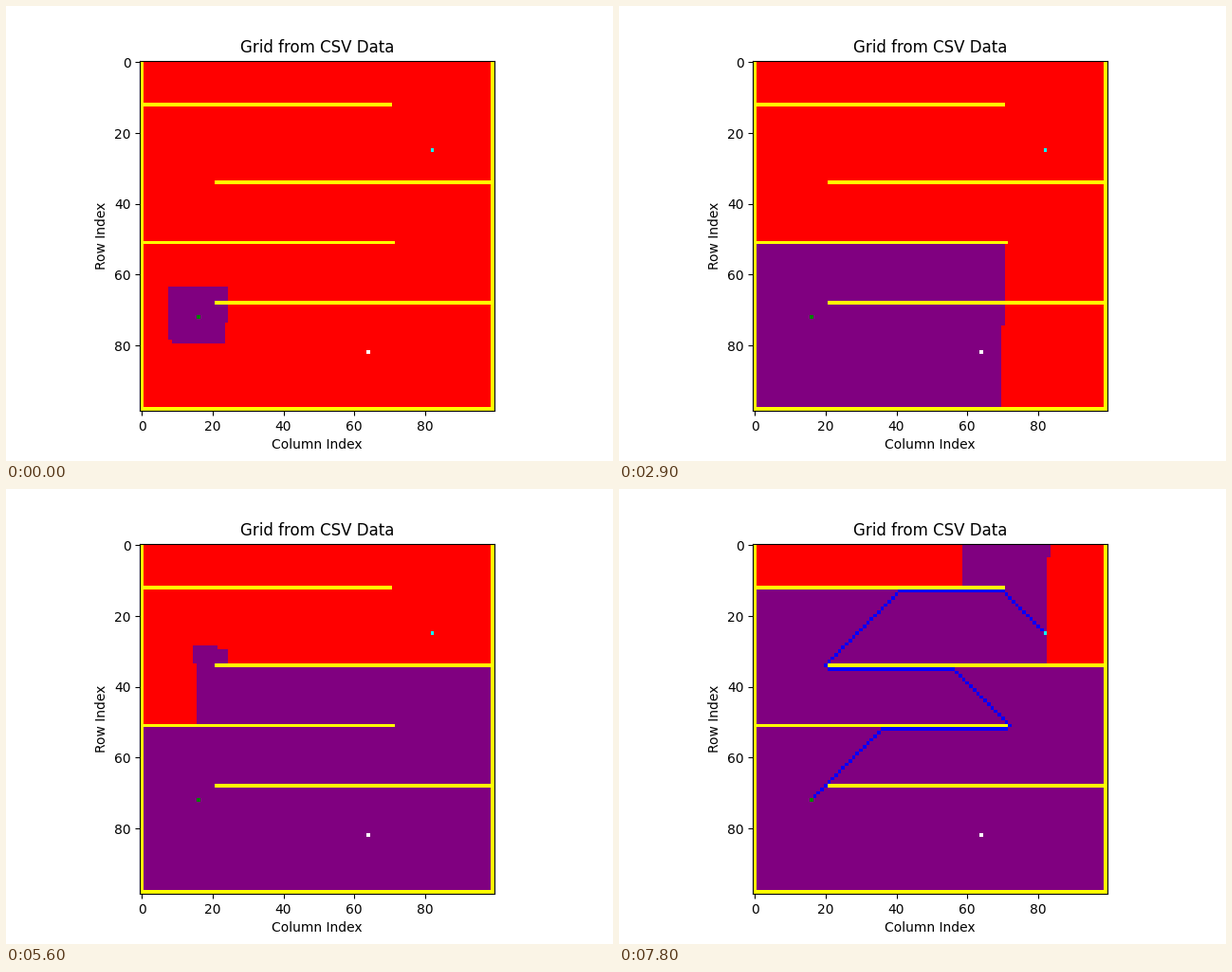
A matplotlib script that plays this animation: 640x480 px, repeating every 8150 ms.

```python
from itertools import product

import matplotlib.pyplot as plt
import numpy as np
from matplotlib.animation import FuncAnimation
from matplotlib.colors import ListedColormap

ROWS, COLS = 99, 100
START, GOAL, MARKER = (72, 16), (25, 82), (82, 64)
FREE, WALL, VISITED, PATH, START_ID, GOAL_ID, MARKER_ID = range(7)
COLORS = ["red", "yellow", "purple", "blue", "green", "cyan", "white"]

INTERVAL = 50            # ms
FRAMES = 163             # 8150 ms
LAST_STEP = 78
FIRST_POPS, POPS_PER_STEP = 200, 100


def build_grid():
    grid = np.full((ROWS, COLS), FREE)
    grid[:, [0, -1]] = WALL
    grid[-1] = WALL
    grid[12, :71] = WALL
    grid[34, 21:] = WALL
    grid[51, :72] = WALL
    grid[68, 21:] = WALL
    grid[MARKER] = MARKER_ID
    return grid


def flood(grid):
    """Breadth-first search; record at which pop each cell is discovered."""
    found_at = np.full(grid.shape, ROWS * COLS)
    found_at[START] = 0
    parent = {START: None}
    queue = [START]
    for pop, (r, c) in enumerate(queue, 1):
        for dr, dc in product((-1, 0, 1), repeat=2):
            cell = (r + dr, c + dc)
            inside = 0 <= cell[0] < ROWS and 0 <= cell[1] < COLS
            if inside and cell not in parent and grid[cell] == FREE:
                parent[cell] = (r, c)
                found_at[cell] = pop
                queue.append(cell)
    return found_at, parent


def trace(parent, cell):
    while cell is not None:
        yield cell
        cell = parent[cell]


base = build_grid()
found_at, parent = flood(base)
path = list(trace(parent, GOAL))


def grid_at(step):
    grid = base.copy()
    grid[found_at <= FIRST_POPS + POPS_PER_STEP * step] = VISITED
    if step == LAST_STEP:
        for cell in path:
            grid[cell] = PATH
    grid[START] = START_ID
    grid[GOAL] = GOAL_ID
    return grid


fig, ax = plt.subplots(figsize=(6.4, 4.8), dpi=100)
image = ax.imshow(grid_at(0), cmap=ListedColormap(COLORS), vmin=-0.5,
                  vmax=len(COLORS) - 0.5, interpolation="nearest")
ax.set_title("Grid from CSV Data")
ax.set_xlabel("Column Index")
ax.set_ylabel("Row Index")


def update(frame):
    image.set_data(grid_at(min(frame // 2, LAST_STEP)))
    return [image]


anim = FuncAnimation(fig, update, frames=FRAMES, interval=INTERVAL,
                     repeat=True, repeat_delay=0)
plt.show()
```
